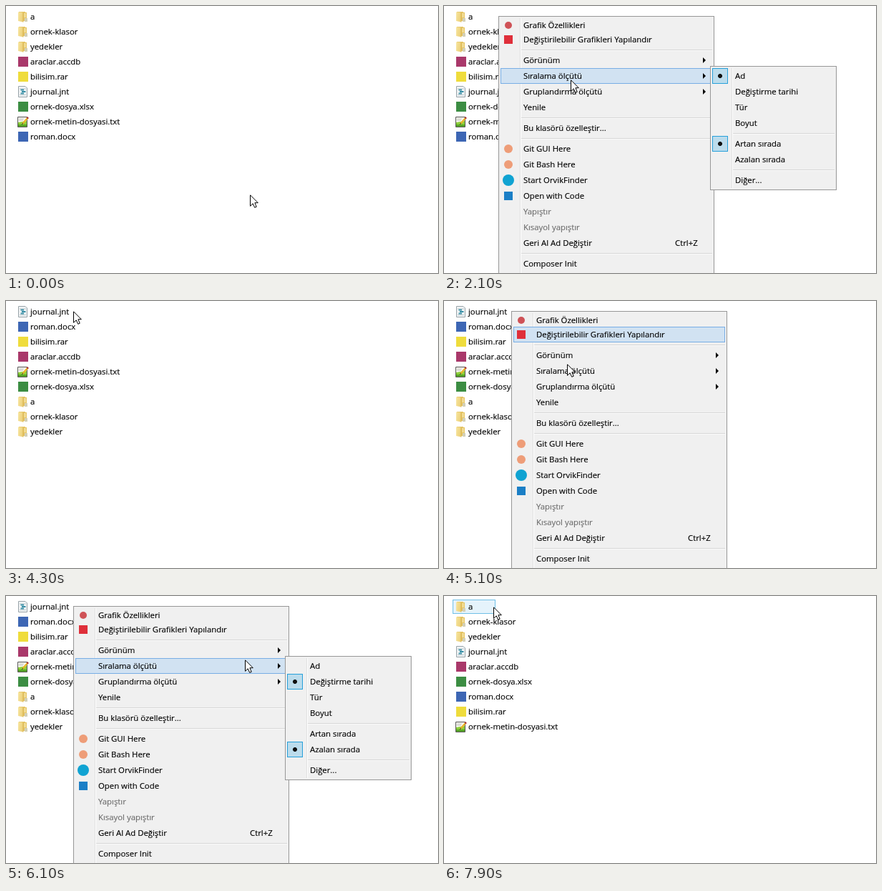
Animation of 604x374 px, one loop 8000 ms. Source, as an HTML page:

```html
<!DOCTYPE html>
<html lang="tr">
<head>
<meta charset="utf-8">
<title>Dosya sıralama</title>
<style>
html, body { margin: 0; width: 100%; height: 100%; overflow: hidden; background: #fff; }
body { position: relative; font: 11.35px "Open Sans", "Noto Sans", sans-serif; -webkit-text-stroke: .15px; color: #000; white-space: pre; cursor: default; }
body > *, .bar, .dot, .row i, .row b, .row u { position: absolute; }
.file, .menu, .sub, .bar, .dot, .cursor, .hover { animation: 8s step-end -5ms infinite; }

/* file list */
.file { left: 34px; line-height: 19px; animation-name: sort; }
.file svg, .file i { position: absolute; left: -18px; top: 2px; }
.file i { width: 14px; height: 14px; margin: 1px; }
.hover { left: 12px; top: 5px; width: 60px; height: 20px; box-sizing: border-box; background: #e5f3fb; border: 1px solid #70c0e7; animation-name: hover; }
@keyframes sort {
  0% { top: calc(5px + var(--a) * 21px); }
  40% { top: calc(5px + var(--b) * 21px); }
  87.5% { top: calc(5px + var(--c) * 21px); }
}
@keyframes hover {
  0%, 11.25% { opacity: 0; }
  10%, 98.75% { opacity: 1; }
}

/* menus */
.menu, .sub { box-sizing: border-box; padding: 3px; background: linear-gradient(90deg, #e0e0e0 50%, #fff 50%) 30px 3px / 2px calc(100% - 6px) no-repeat #f0f0f0; box-shadow: inset 0 0 0 1px #979797; }
.menu { top: 14px; width: 302px; height: 380px; animation-name: menu; }
.sub { width: 177px; height: 174px; animation-name: sub; }
.row { position: relative; height: 22px; line-height: 21px; padding-left: 32px; }
.row.first { height: 19px; line-height: 19px; }
.row.off { color: #6d6d6d; }
.row i { left: 3px; top: 3px; width: 16px; height: 16px; box-sizing: border-box; border: 0 solid transparent; background-clip: padding-box; }
.row i.disc { border-radius: 50%; }
.row b { left: 283px; top: 7px; border: 4px solid transparent; border-left-color: #000; border-right: 0; }
.row u { left: 244px; text-decoration: none; }
.sep { height: 7px; }
.sep::after { content: ""; display: block; margin-left: 29px; position: relative; top: 3px; height: 1px; background: #d7d7d7; box-shadow: 0 1px #fafafa; }
.bar { left: 3px; right: 3px; height: 22px; box-sizing: border-box; background: #d1e2f2; border: 1px solid #78aee5; }
.menu .bar { animation-name: pick; }
.sub .bar { animation-name: subpick; }
.dot { left: 3px; width: 22px; height: 22px; box-sizing: border-box; border: 1px solid #26a0da; background: radial-gradient(circle, #111 2.6px, #bcdcec 3.4px); animation-name: dot; }
@keyframes menu {
  0%, 40%, 87.5% { visibility: hidden; }
  16.25% { visibility: visible; left: 76px; }
  58.75% { visibility: visible; left: 94px; }
}
@keyframes sub {
  0%, 40%, 87.5% { visibility: hidden; }
  26.25% { visibility: visible; left: 372px; top: 84px; }
  70% { visibility: visible; left: 390px; top: 106px; }
  72.5% { visibility: visible; left: 390px; top: 84px; }
}
@keyframes pick {
  0%, 40%, 87.5% { opacity: 0; top: 3px; height: 19px; }
  20%, 62.5% { opacity: 1; top: 3px; height: 19px; }
  23.75%, 63.75% { opacity: 1; top: 22px; height: 22px; }
  25%, 65%, 72.5% { opacity: 1; top: 73px; height: 22px; }
  66.25% { opacity: 1; top: 95px; height: 22px; }
}
@keyframes subpick {
  0%, 40%, 87.5% { opacity: 0; top: 3px; }
  31.25%, 77.5% { opacity: 1; top: 3px; }
  32.5%, 78.75% { opacity: 1; top: 25px; }
  80% { opacity: 1; top: 47px; }
}
@keyframes dot {
  0% { opacity: 1; margin-top: 0; }
  40% { opacity: 0; margin-top: 22px; }
  72.5% { opacity: 1; margin-top: 22px; }
}

/* pointer */
.cursor { animation-name: move; }
@keyframes move {
  0% { left: 341px; top: 264px; animation-timing-function: steps(8); }
  10% { left: 69px; top: 16px; }
  11.25% { left: 75px; top: 14px; }
  12.5% { left: 76px; top: 14px; }
  20% { left: 77px; top: 15px; }
  21.25% { left: 80px; top: 17px; }
  23.75% { left: 118px; top: 45px; }
  25% { left: 158px; top: 85px; }
  26.25% { left: 177px; top: 103px; animation-timing-function: steps(4); }
  31.25% { left: 378px; top: 104px; animation-timing-function: steps(2); }
  33.75% { left: 399px; top: 119px; }
  35% { left: 402px; top: 119px; }
  36.25% { left: 404px; top: 119px; }
  43.75% { left: 403px; top: 119px; }
  46.25% { left: 403px; top: 119px; animation-timing-function: steps(6); }
  53.75% { left: 94px; top: 14px; }
  62.5% { left: 130px; top: 46px; }
  63.75% { left: 172px; top: 88px; animation-timing-function: steps(2); }
  66.25% { left: 190px; top: 112px; animation-timing-function: steps(3); }
  70% { left: 240px; top: 113px; }
  72.5% { left: 261px; top: 100px; }
  73.75% { left: 261px; top: 100px; animation-timing-function: steps(2); }
  76.25% { left: 334px; top: 89px; animation-timing-function: steps(3); }
  80% { left: 404px; top: 132px; }
  81.25% { left: 408px; top: 137px; }
  86.25% { left: 408px; top: 137px; animation-timing-function: steps(9); }
  97.5% { left: 83px; top: 19px; }
  98.75%, 100% { left: 69px; top: 15px; }
}
</style>
</head>
<body>
<svg width="0" height="0">
  <defs>
    <linearGradient id="gold" x2="1" y2=".4"><stop stop-color="#f8e6a0"/><stop offset="1" stop-color="#ecd07a"/></linearGradient>
    <g id="folder">
      <path d="M2 1H11V2H13V14H2Z" fill="#e6c667"/>
      <path d="M9 3H12V9H9Z" fill="#f1dc94"/>
      <path d="M1 1.500L8 2V15.500L1 14Z" fill="url(#gold)"/>
      <path d="M8 2V15.500" stroke="#d6b04a"/>
      <path d="M10 10H14V15H10Z" fill="#d3d0b8"/>
    </g>
  </defs>
</svg>

<div class="hover"></div>
<div class="file" style="--a:0;--b:6;--c:0"><svg width="16" height="16"><use href="#folder"/></svg>a</div>
<div class="file" style="--a:1;--b:7;--c:1"><svg width="16" height="16"><use href="#folder"/></svg>ornek-klasor</div>
<div class="file" style="--a:2;--b:8;--c:2"><svg width="16" height="16"><use href="#folder"/></svg>yedekler</div>
<div class="file" style="--a:3;--b:3;--c:4"><i style="background:#a9386a"></i>araclar.accdb</div>
<div class="file" style="--a:4;--b:2;--c:7"><i style="background:#efdc3c"></i>bilisim.rar</div>
<div class="file" style="--a:5;--b:0;--c:3"><svg width="16" height="16"><path d="M1.500 .5H11L13.500 3V15.500H1.500Z" fill="#f1f4f5" stroke="#98a2a8"/><path d="M3 4H12M3 12.500H12" stroke="#b9c6cc"/><path d="M4.500 5.500H9M6 8H11.500M4.500 10.500H9" stroke="#3a8fa6" stroke-width="2"/></svg>journal.jnt</div>
<div class="file" style="--a:6;--b:5;--c:5"><i style="background:#3c8d43"></i>ornek-dosya.xlsx</div>
<div class="file" style="--a:7;--b:4;--c:8"><svg width="16" height="16"><path d="M.5 1.500H13.500V15.500H.5Z" fill="#fbfbf2" stroke="#555"/><path d="M1 9L13 7V15H1Z" fill="#8ccf3a"/><path d="M1 12H13V15H1Z" fill="#56a526"/><path d="M2 4H9M2 6H8" stroke="#bbb"/><path d="M7 11L14 3" stroke="#e9b32a" stroke-width="2.500"/><path d="M13.500 3.500L15 2" stroke="#a33" stroke-width="2.500"/><path d="M6 12L8 10" stroke="#333"/></svg>ornek-metin-dosyasi.txt</div>
<div class="file" style="--a:8;--b:1;--c:6"><i style="background:#3d66b4"></i>roman.docx</div>

<div class="menu"><div class="bar"></div><div class="row first"><i class="disc" style="background-color:#cf5257;border-width:3px;top:2px"></i>Grafik Özellikleri</div><div class="row"><i style="background-color:#df2f3a;border-width:2px"></i>Değiştirilebilir Grafikleri Yapılandır</div><div class="sep"></div><div class="row">Görünüm<b></b></div><div class="row">Sıralama ölçütü<b></b></div><div class="row">Gruplandırma ölçütü<b></b></div><div class="row">Yenile</div><div class="sep"></div><div class="row">Bu klasörü özelleştir...</div><div class="sep"></div><div class="row"><i class="disc" style="background-color:#ee9d78;border-width:2px"></i>Git GUI Here</div><div class="row"><i class="disc" style="background-color:#ee9d78;border-width:2px"></i>Git Bash Here</div><div class="row"><i class="disc" style="background-color:#10a3d2"></i>Start OrvikFinder</div><div class="row"><i style="background-color:#1b7fc6;border-width:2px"></i>Open with Code</div><div class="row off">Yapıştır</div><div class="row off">Kısayol yapıştır</div><div class="row">Geri Al Ad Değiştir<u>Ctrl+Z</u></div><div class="sep"></div><div class="row">Composer Init</div></div>

<div class="sub"><div class="bar"></div><div class="dot" style="top:3px"></div><div class="dot" style="top:98px"></div><div class="row">Ad</div><div class="row">Değiştirme tarihi</div><div class="row">Tür</div><div class="row">Boyut</div><div class="sep"></div><div class="row">Artan sırada</div><div class="row">Azalan sırada</div><div class="sep"></div><div class="row">Diğer...</div></div>

<svg class="cursor" width="12" height="19"><path d="M.5 .8V16.300L4.200 12.800L6.700 18.300L9.200 17.300L6.900 11.700H11.300Z" fill="#fff" stroke="#000"/></svg>
</body>
</html>
```
